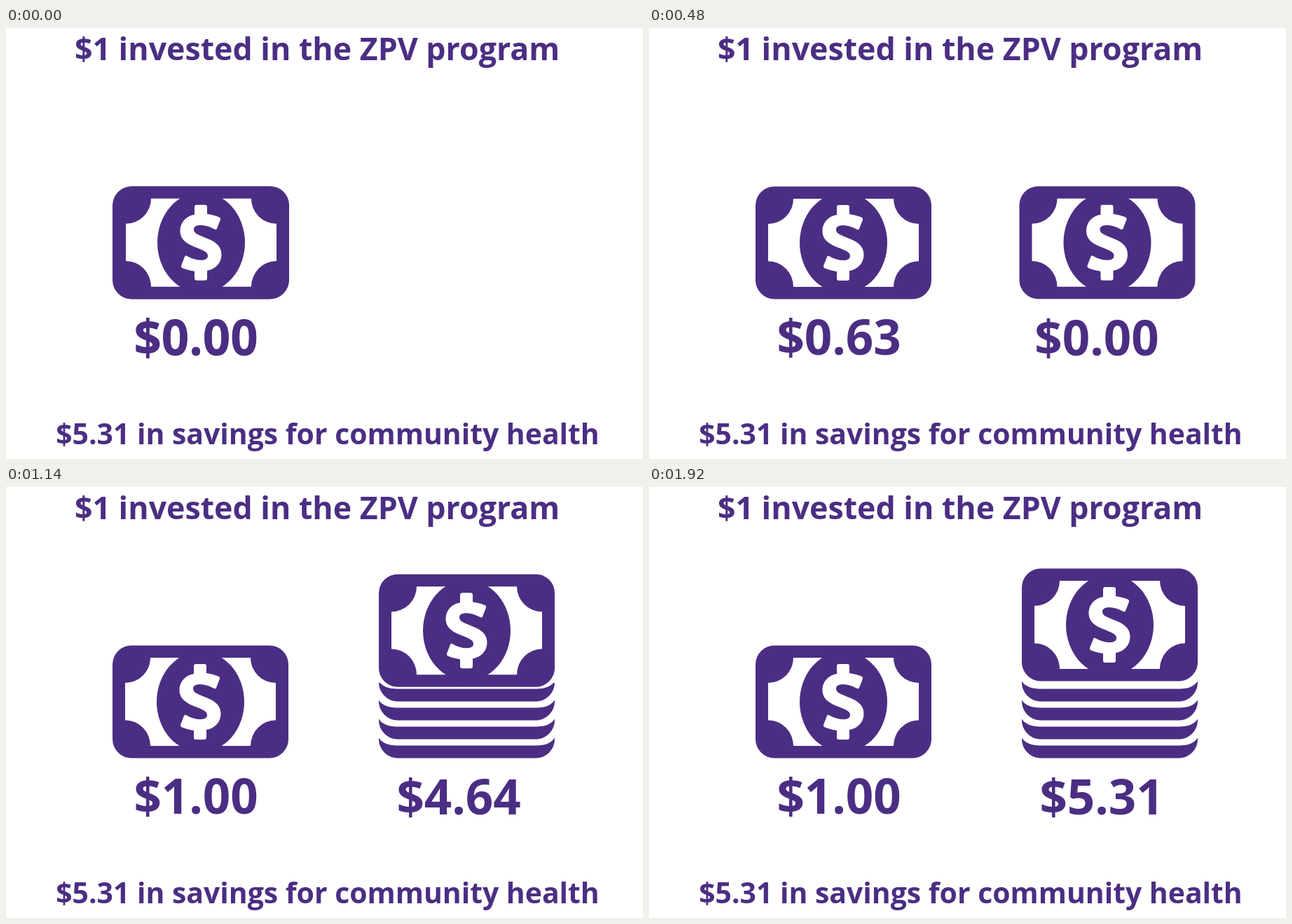
Write an HTML page that moves like this. It is 909 px wide and 616 px high and loops after 3.92 s.

```html
<!DOCTYPE html>
<html lang="en">
<head>
<meta charset="utf-8">
<title>Return on investment</title>
<style>
  html, body { margin: 0; width: 100%; height: 100%; overflow: hidden; background: #fff; }
  svg { display: block; width: 100%; height: 100%; fill: #4b2e83; }
  text { font: 700 69px "Open Sans", sans-serif; white-space: pre; }
  .title { font-size: 44.7px; }
  .footer { font-size: 40.94px; }
  .paper { fill: #fff; }
</style>
</head>
<body>
<svg viewBox="0 0 909 616">
  <defs>
    <g id="bill">
      <rect x="-125.5" y="-80.5" width="251" height="161" rx="27"/>
      <path class="paper" d="M-71.5-63H71.5A36 36 0 0 0 107.5-27V26.3A36 36.7 0 0 0 71.5 63H-71.5A36 36.7 0 0 0-107.5 26.3V-27A36 36 0 0 0-71.5-63Z"/>
      <ellipse rx="62.5" ry="72"/>
      <path class="paper" transform="translate(-.5)" d="M-9-51q0-3 3-3h12q3 0 3 3v10C16-40 22-38 26-36.5Q28.5-35.5 28-33L23-20Q22-18 20-19C13-23 6-25 0-25C-6-25-10-23-10-19C-10-14-6-12 4-8C20-2 29.5 4 29.5 17C29.5 29 21 38 9 40v11q0 3-3 3h-12q-3 0-3-3v-10C-16 40-22 38-26 36.5Q-28.5 35.5-28 33L-23 20Q-22 18-20 19C-13 23-6 25 0 25C6 25 10 23 10 19C10 14 6 12-4 8C-20 2-29.5-4-29.5-17C-29.5-29-21-38-9-40Z"/>
    </g>
    <path id="edge" d="M532 358.5C537 366 546 369.5 558 369.5H757C769 369.5 778 366 783 358.5V360.5A27 27 0 0 1 756 387.5H559A27 27 0 0 1 532 360.5Z"/>
    <clipPath id="reveal"><rect id="revealBox" x="520" width="280" height="200"/></clipPath>
  </defs>

  <text class="title" x="98" y="46">$1 invested in the ZPV program</text>
  <text class="footer" x="71.2" y="595.4">$5.31 in savings for community health</text>

  <use href="#bill" x="277.5" y="307"/>
  <text id="cost" x="182.4" y="467"></text>

  <g clip-path="url(#reveal)">
    <use href="#edge"/>
    <use href="#edge" y="-27"/>
    <use href="#edge" y="-54"/>
    <use href="#edge" y="-81"/>
  </g>
  <use id="topBill" href="#bill"/>
  <text id="savings" y="468"></text>
</svg>
<script>
  const LOOP = 3920, STEP = 30, LAST = 1920;
  const FLOOR = 387.5;
  const byId = id => document.getElementById(id);
  const [cost, savings, topBill, revealBox] =
    ['cost', 'savings', 'topBill', 'revealBox'].map(byId);

  const easeOut = (t, start, duration, power) => {
    const p = Math.min(1, Math.max(0, (t - start) / duration));
    return 1 - (1 - p) ** power;
  };
  const settle = (t, start, decay) => 1 - Math.exp(-Math.max(0, t - start) / decay);
  const money = value => '$' + value.toFixed(2);

  function draw(t) {
    const slide = easeOut(t, 19, 758, 5);
    const textSlide = easeOut(t, 45, 793, 5);
    const rise = settle(t, 795, 133);

    topBill.setAttribute('x', 278.5 + 379 * slide);
    topBill.setAttribute('y', 306.7 - 109.7 * rise);
    revealBox.setAttribute('y', FLOOR + 0.8 - 117 * rise);

    cost.textContent = money(easeOut(t, 243, 1075, 4));
    savings.textContent = money(5.31 * easeOut(t, 514, 1552, 4));
    savings.setAttribute('x', 182.4 + 375 * textSlide);
  }

  const origin = performance.now();
  function tick() {
    const t = (performance.now() - origin) % LOOP;
    draw(Math.min(LAST, Math.floor(t / STEP) * STEP));
    requestAnimationFrame(tick);
  }
  tick();
</script>
</body>
</html>
```
